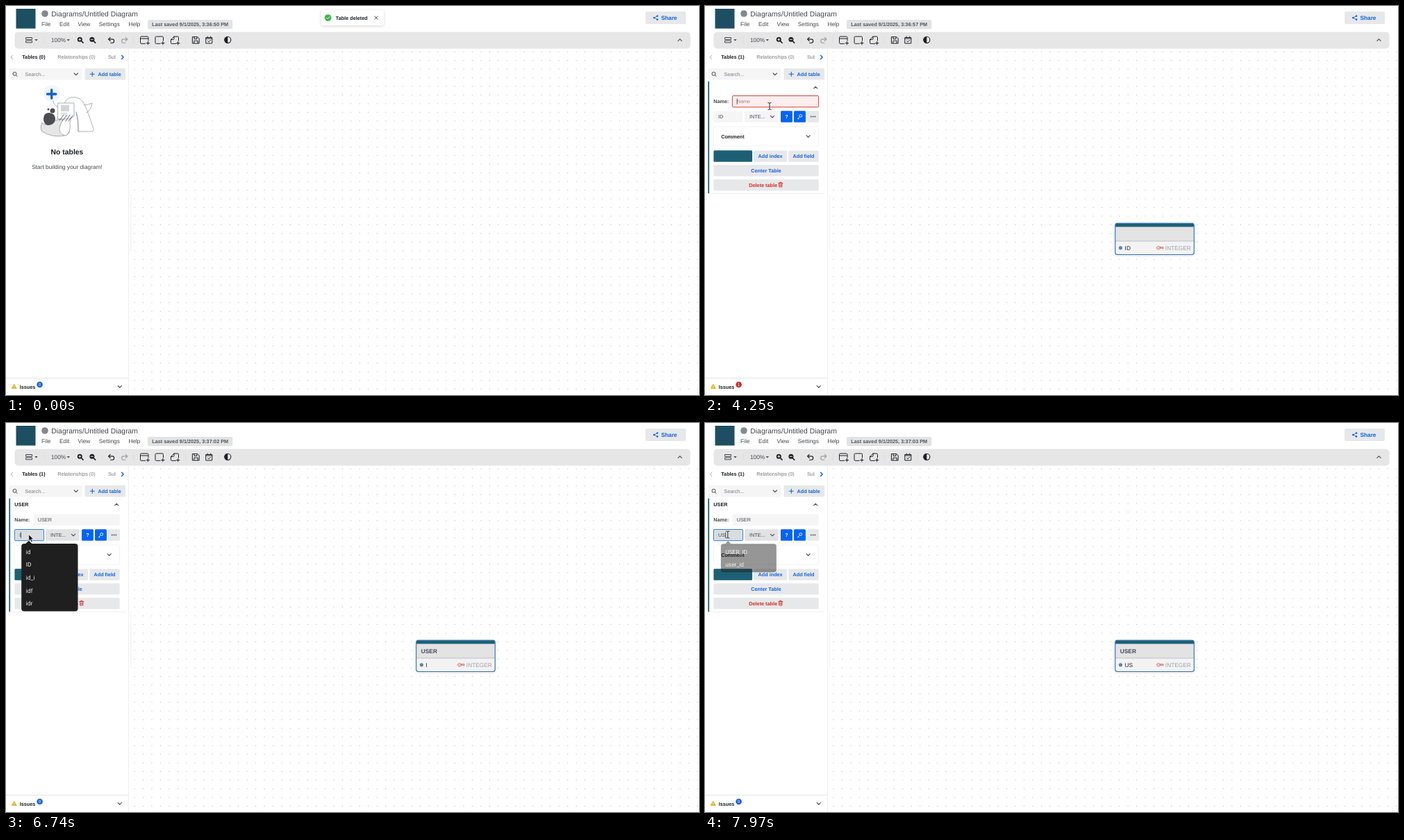
Animation of 998x561 px, one loop 7.99 s. Source, as an HTML page:

```html
<!DOCTYPE html>
<html lang="en">
<head>
<meta charset="utf-8">
<title>Diagram editor</title>
<style>
html, body { margin: 0; width: 100%; height: 100%; overflow: hidden; background: #fff; }
svg { display: block; }
text { font-family: "Liberation Sans", Arial, sans-serif; text-rendering: geometricPrecision; white-space: pre; }
.menu text { font-family: Roboto, sans-serif; }
.soft { filter: drop-shadow(0 1px 2px rgba(0,0,0,.16)); }
</style>
</head>
<body>
<svg id="stage" width="998" height="561" viewBox="0 0 998 561">
  <defs>
    <pattern id="dots" x="178.76" y="59.76" width="12.475" height="12.475" patternUnits="userSpaceOnUse">
      <circle cx="6.24" cy="6.24" r=".55" fill="#929ca5"/>
    </pattern>
    <clipPath id="tabClip"><rect x="140" y="64" width="18" height="20"/></clipPath>
  </defs>
  <g id="base"></g>
  <g id="live"></g>
</svg>
<script>
const LOOP = 7990, S = 7.277, M = 8.32, L = 10.4;
const INK = '#1c1f23', GREY = '#45484d', BLUE = '#1063dd', FILL = '#0064fa',
      BTN = '#e7e8ea', PALE = '#f5f5f6', TEAL = '#1d6075', RED = '#d52a22';

// SVG helpers; text is placed by its vertical centre
const rect = (x, y, w, h, fill, r = 0, more = '') =>
  `<rect x="${x}" y="${y}" width="${w}" height="${h}" rx="${r}" fill="${fill}" ${more}/>`;
const circle = (x, y, r, fill, more = '') => `<circle cx="${x}" cy="${y}" r="${r}" fill="${fill}" ${more}/>`;
const text = (x, y, s, size = S, fill = INK, bold = 0, anchor = 'start') =>
  `<text x="${x}" y="${y + size * .36}" font-size="${size}" fill="${fill}" text-anchor="${anchor}" font-weight="${bold ? 700 : 400}">${s}</text>`;
const line = (d, color = INK, w = 1, fill = 'none') =>
  `<path d="${d}" fill="${fill}" stroke="${color}" stroke-width="${w}" stroke-linecap="round" stroke-linejoin="round"/>`;
const shape = (d, fill) => `<path d="${d}" fill="${fill}"/>`;
const group = (s, more) => `<g ${more}>${s}</g>`;
const chevron = (x, y, up = 0, color = GREY) => {
  const h = up ? -1.3 : 1.3;
  return line(`M${x - 2.6} ${y - h}L${x} ${y + h}L${x + 2.6} ${y - h}`, color, 1.1);
};
const caretDown = (x, y) => shape(`M${x - 2.2} ${y - 1}h4.4l-2.2 2.4z`, GREY);
const button = (x, y, w, label, color = BLUE) =>
  rect(x, y, w, 16.3, BTN, 1.5) + text(x + w / 2, y + 8.2, label, S, color, 1, 'middle');

// Time helpers
const clamp = v => Math.min(1, Math.max(0, v));
const ramp = (t, a, b) => clamp((t - a) / (b - a));
const ease = v => v * v * (3 - 2 * v);
const pick = (t, steps) => steps.filter(s => s[0] <= t).pop()[1];

const measure = document.createElement('canvas').getContext('2d');
measure.font = '100px "Liberation Sans", Arial, sans-serif';
const width = (s, size = S) => measure.measureText(s).width * size / 100;

function toolbar() {
  let s = rect(12.5, 37.5, 973, 24, '#e6e6e7', 5);
  for (const x of [55.5, 138, 183.5, 258, 306]) s += rect(x, 44, .5, 10, '#d6d7d9');
  s += line('M29 45.5h8.500v2.800h-8.500zM29 50h8.500v2.800h-8.500z', GREY, 1) + caretDown(43.5, 49);
  s += text(65, 49, '100%', M, GREY) + caretDown(89.800, 49);
  for (const x of [106.3, 123.9])
    s += circle(x, 48.3, 3.5, INK) + line(`M${x + 2.6} 50.900l2.200 2.200`, INK, 1.5) + line(`M${x - 1.6} 48.300h3.200`, '#fff', .9);
  s += line('M106.3 46.700v3.200', '#fff', .9);
  s += line('M150.200 45.300l-2.700 2.600 2.700 2.600M147.800 47.900h5.200a2.700 2.700 0 0 1 0 5.400h-2.500', INK, 1.1);
  s += line('M172.200 45.300l2.700 2.600-2.700 2.600M174.600 47.900h-5.200a2.700 2.700 0 0 0 0 5.400h2.500', '#9a9da1', 1.1);
  return s;
}

function tools() {
  let s = '';
  const plus = x => line(`M${x} 53.500h4.400M${x + 2.2} 51.300v4.400`, INK, 1);
  for (const x of [193.5, 215])
    s += line(`M${x + 7} 54.300h-5.500a1.500 1.500 0 0 1-1.500-1.500v-7.300a1.500 1.500 0 0 1 1.500-1.500h8.500a1.500 1.500 0 0 1 1.500 1.500v4.500`, INK, 1) + plus(x + 8.700);
  s += line('M194 47h10.500', INK, 1);
  s += line('M244.500 54.300h-5.500a1.500 1.500 0 0 1-1.500-1.500v-4.300l4.500-4.500h5a1.500 1.500 0 0 1 1.500 1.500v4.500M237.500 48.500h3a1.500 1.500 0 0 0 1.500-1.500v-3', INK, 1) + plus(245.500);
  s += line('M268.800 44.500h7l2.400 2.400v7h-9.400zM271 44.700v2.800h4v-2.800M270.800 53.700v-3.500h5.400v3.500', INK, 1);
  s += line('M288.200 45.500h8.600v8.400h-8.600zM288.200 47h8.600M290.300 44v1.500M294.700 44v1.500M290.700 50.500l1.400 1.300 2.500-2.500', INK, 1);
  s += circle(319.300, 48.800, 4.600, 'none', `stroke="${INK}" stroke-width="1.1"`) + shape('M319.300 44.200a4.600 4.600 0 0 0 0 9.200z', INK);
  return s;
}

function base() {
  let s = rect(177, 62, 821, 499, 'url(#dots)');
  s += rect(176, 62, .8, 499, '#e9eaeb') + rect(179.3, 272, 1, 82, '#f0f0f1');
  s += rect(14.5, 4, 28, 28.5, '#1d4f63') + circle(56, 11, 4.8, '#85888c');
  s += text(65.3, 11, 'Diagrams/Untitled Diagram', L, GREY);
  [[51, 'File'], [77, 'Edit'], [103.5, 'View'], [133.800, 'Settings'], [176.400, 'Help']]
    .forEach(([x, w]) => s += text(x, 26.3, w, M, GREY));
  s += rect(204, 20, 122.3, 13.3, '#e2e3e5', 2);
  s += rect(921, 8, 58, 18, BTN, 2) + text(943.4, 17, 'Share', M, BLUE, 1);
  s += line('M938 14.600l-4.700 2.400 4.700 2.400', BLUE, .8) +
    circle(938, 14.5, 1.3, BLUE) + circle(933.3, 17, 1.3, BLUE) + circle(938, 19.5, 1.3, BLUE);
  s += toolbar() + chevron(970.5, 49, 1);
  s += line('M9.700 71.200l-2.500 2.700 2.500 2.700', '#a5a7aa', 1) + line('M166.600 71.200l2.500 2.700-2.500 2.700', BLUE, 1.4);
  s += group(text(147, 73.8, 'Subject Areas', S, '#77797c'), 'clip-path="url(#tabClip)"');
  s += rect(4.5, 90, 104.5, 16.5, PALE, 1.5) + text(27.300, 98.300, 'Search...', S, '#77797c');
  s += circle(12.5, 97.8, 2.5, 'none', `stroke="${GREY}" stroke-width="1"`) + line('M14.400 99.700l1.800 1.800', GREY, 1) + chevron(100.8, 98.3);
  s += rect(113.5, 90, 58.5, 16.5, BTN, 1.5) + line('M121.300 98.300h6M124.300 95.300v6', BLUE, 1.1) + text(132.600, 98.300, 'Add table', S, BLUE, 1);
  s += rect(0, 535.500, 176, 1, '#f4f4f4') + rect(0, 536.5, 176, 1, '#e6e7e8');
  s += line('M11.900 545.700l3.300 5.900h-6.600z', '#e5b220', 1, '#e5b220') + line('M11.900 547.800v1.700M11.900 551v.1', '#fff', .8);
  return s + text(19.700, 549, 'Issues', S, INK, 1) + chevron(163.8, 549);
}

function emptyState() {
  const g = '#8c8f93';
  let s = circle(66, 126, 12, '#f0f6fd');
  s += line('M84 142C86 129 103 129 110 137C116 145 121 163 126 177Q127 181 122 181H104Q104 165 101 153', g, .7, '#fff');
  s += line('M112 143Q117 143 124 140Q123 150 116 154M101 153Q105 160 104 181', g, .7);
  s += line('M52 169Q60 175 70 166Q82 158 90 172Q95 185 84 187Q66 190 52 181Q48 175 52 169Z', g, .7, '#e6e6e7');
  s += line('M78 172Q74 185 86 187Q94 182 92 168L97 153Q85 152 78 172Z', g, .7, '#fff');
  s += line('M75 140h23v19l-7 4H75z', g, .7, '#fff') + rect(79, 143, 12, 9, '#d4d5d7') + line('M79 154.500h9M79 157h7', '#aaa', .7);
  s += line('M77 165l6-8M81 166l7-9M86 166l6-9M90 166l6-8', '#63666a', 1);
  s += shape('M54 163Q54 154 62 154Q71 154 71 164Q69 172 60 172Q54 170 54 163Z', '#4b4d50') + circle(67, 151, 3.5, '#4b4d50') + circle(61, 149, 1.5, '#4b4d50');
  s += line('M68 137q1 7 6 8', g, .7);
  s += line('M59.500 127h12.400M65.700 120.800v12.400', '#1160d8', 3.3);
  return s + text(88, 210.3, 'No tables', L, INK, 1, 'middle') + text(88, 231.8, 'Start building your diagram!', M, GREY, 0, 'middle');
}

function card(t, name, field) {
  const edge = t < 2500 ? '#5c6168' : '#2f71bb';
  let s = group(rect(590.8, 313.5, 113.5, 45, '#f3f3f4', 3), 'class="soft"');
  s += rect(591, 318, 113, 21, '#e3e3e4') + rect(591, 338.700, 113, .7, '#a8abae');
  s += shape('M591 318.500v-2.500q0-2.500 2.500-2.500h108q2.500 0 2.500 2.500v2.500z', TEAL);
  s += rect(590.8, 313.3, 113.5, 45.2, 'none', 3, `stroke="${edge}" stroke-width="1.1"`);
  s += text(597.800, 329, name, M, GREY, 1) + circle(598.4, 348.8, 2.6, '#5b84a8') + text(604.600, 348.8, field, M, INK);
  s += line('M655 347.800h5v2h-1.500v-.6h-3.500M655 347.500a2.500 2.200 0 1 0 0 2.700z', '#d45a58', .9) + circle(652.6, 348.8, .6, '#d45a58');
  return s + text(699.800, 348.8, 'INTEGER', M, '#9c9fa3', 0, 'end');
}

function panel(t, name, field) {
  const o = name ? 2 : 0, onName = t >= 3120 && t < 6130, onField = t >= 6130;
  const bottom = 129.5 + (141 + o) * ease(ramp(t, 2550, 2840));
  let s = '';
  if (t >= 2550) {
    const edge = !name ? RED : onName ? '#1f74d0' : 'none';
    s += text(12.300, 137.800, 'Name:', S, GREY, 1);
    s += rect(39.400, 129.4, 124.2, 16.4, name ? PALE : '#fceeec', 1.5, `stroke="${edge}" stroke-width=".9"`);
    s += text(45.700, 137.800, name || 'Name', S, name ? GREY : '#a08988');
    if (onName && (t < 3430 || t >= 3660) && !(t >= 4100 && t < 4250))
      s += rect(45.800 + width(name), 133.5, .7, 8.5, INK);
    s += rect(12.4, 151.5, 42.2, 16.2, onField ? '#d9dde1' : PALE, 1.5, onField ? 'stroke="#1f74d0" stroke-width=".9"' : '');
    s += text(19, 159.600, field, S, GREY);
    if (onField) s += rect(19.300 + width(field), 155.4, .7, 8.5, INK);
    s += rect(57, 151.3, 48.5, 16.5, onField ? '#e1e2e3' : PALE, 1.5) + text(64, 159.600, 'INTE...', S, GREY) + chevron(97, 159.6);
    s += rect(109, 151.3, 17, 16.5, FILL, 1.5) + text(117.5, 159.6, '?', S, '#fff', 1, 'middle');
    s += rect(128, 151.3, 17, 16.5, FILL, 1.5) + circle(137.700, 158.4, 1.9, 'none', 'stroke="#fff" stroke-width=".9"') + line('M136.300 159.900l-2.800 2.800h1.600', '#fff', .9);
    s += rect(147, 151.3, 17, 16.5, BTN, 1.5) + [152.8, 155.6, 158.4].map(x => circle(x, 159.5, .9, GREY)).join('');
    s += rect(12.4, 174, 151.3, 28, '#fff', 2.5, 'stroke="#ececed" stroke-width=".7"') + text(23.200, 188, 'Comment', S, INK, 1) + chevron(148.6, 188);
    s += rect(12.4, 208.3, 55.7, 16.5, TEAL, 1.5) + button(70, 208.4, 48.200, 'Add index') + button(120.3, 208.4, 43.400, 'Add field');
    s += button(12.4, 229.3, 151.3, 'Center Table') + button(12.4, 250, 151.3, '', RED);
    s += text(63.300, 258.2, 'Delete table', S, RED, 1) + line('M105.800 255.500h6M107.600 255.300v-1h2.400v1M106.600 255.700l.2 5.300h4l.2-5.300M108 257.300v2M109.700 257.300v2', RED, .9);
    s = group(s, `transform="translate(0 ${o})"`);
  }
  s = rect(4.3, 108.8, 1.8, bottom - 108.8, TEAL) + text(12.300, 117.800, name, S, INK, 1) + chevron(159.2, 117.6, t >= 2520) + s;
  return `<svg width="176" height="${bottom}">${s}</svg>` + rect(6, bottom - .5, 166, .7, '#e9eaeb');
}

function popup(items, a) {
  if (a <= 0) return '';
  const h = items.length > 2 ? 97.5 : 41.500, k = .97 + .03 * a, cx = 62.8, cy = 174 + h / 2;
  const s = rect(22.200, 174, 81.3, h, '#1f1f1f', 4) + shape('M28 174.300l4.800-4.500 4.800 4.500z', '#1f1f1f') +
    items.map((w, i) => text(28.700, 185.5 + 18.7 * i, w, 8.5, '#f0f0f0')).join('');
  return group(s, `class="menu" opacity="${a}" transform="translate(${cx * (1 - k)} ${cy * (1 - k)}) scale(${k})"`);
}

function toast(t) {
  const e = ease(ramp(t, 860, 1110));
  if (e === 1) return '';
  const s = group(rect(454, 6, 90, 22, '#fff', 3), 'class="soft"') + circle(463.7, 17, 4.8, '#3bb346') +
    line('M461.500 17.100l1.600 1.600 2.900-3.200', '#fff', 1) + text(474.800, 17, 'Table deleted', S, INK, 1) +
    line('M531 14.800l4.400 4.400M535.400 14.800l-4.400 4.400', GREY, 1);
  return group(s, `opacity="${1 - e}" transform="translate(0 ${-30 * e})"`);
}

const PATH = [[360, 800, 457], [500, 211, 77], [700, 211, 77], [820, 197, 50], [1760, 197, 50],
  [2400, 94, 122], [2860, 94, 122], [3080, 93, 144.5], [5820, 93, 144.5], [6120, 32.8, 161], [LOOP, 32.8, 161]];
const POINTER = [[0, 'arrow'], [780, 'hand'], [1800, 'arrow'], [2360, 'hand'], [2960, 'beam'], [6720, 'arrow'], [6980, 'beam']];
const CURSORS = {
  arrow: line('M0 0v9.300l2.200-2 1.500 3.500 1.600-.7-1.500-3.400h3z', '#fff', .7, '#000'),
  hand: line('M-.8 .6q.8-1.200 1.700 0v3.500l4 .9q1 .4.900 1.600l-.7 3.900h-5l-2.900-3.800q.2-1.300 2 0z', '#fff', .6, '#111'),
  beam: line('M-2.200-5q1.700 0 2.200.8q.5-.8 2.200-.8M0-4.200v8.400M-2.200 5q1.700 0 2.200-.8q.5.8 2.200.8', '#222', .9)
};
function cursor(t) {
  if (t < 360) return '';
  const i = PATH.findIndex(p => p[0] > t), [t0, x0, y0] = PATH[i - 1], [t1, x1, y1] = PATH[i];
  const e = ease(ramp(t, t0, t1));
  return group(CURSORS[pick(t, POINTER)], `transform="translate(${x0 + (x1 - x0) * e} ${y0 + (y1 - y0) * e})"`);
}

function live(t) {
  const made = t >= 1360;
  const name = pick(t, [[0, 'TABLE_0'], [3430, 'TABLE_'], [3930, 'TABLE'], [3960, 'TABL'], [3990, 'TAB'], [4030, 'TA'],
    [4060, 'T'], [4100, ''], [4680, 'U'], [5020, 'US'], [5210, 'USE'], [5340, 'USER']]);
  const field = pick(t, [[0, 'ID'], [6720, 'I'], [6980, ''], [7440, 'U'], [7880, 'US']]);
  const clock = pick(t, [[0, '36:50'], [1400, '36:57'], [6330, '37:01'], [6730, '37:02'], [7460, '37:03']]);
  const issues = name && field ? 0 : 1;
  const tip = ramp(t, 900, 1000) - ramp(t, 1780, 1880);

  let s = text(265.2, 26.5, `Last saved 9/1/2025, 3:${clock} PM`, S, '#515459', 1, 'middle');
  if (t >= 780 && t < 1800) s += rect(188, 41, 22.500, 16.3, '#c5c7c9', 2);
  s += tools();
  s += text(23.200, 73.8, `Tables (${+made})`, S, INK, 1) + text(74.200, 73.8, 'Relationships (0)', S, '#77797c');
  s += circle(48.6, 546, 4.3, issues ? RED : BLUE) + text(48.6, 546, issues, 6.2, '#fff', 0, 'middle');
  s += made ? card(t, name, field) + panel(t, name, field) : emptyState();
  s += popup(['id', 'ID', 'id_i', 'idf', 'idr'], ramp(t, 6160, 6280) - ramp(t, 6840, 7020));
  s += popup(['USER_ID', 'user_id'], ramp(t, 7470, 7595) - ramp(t, 7880, 8050));
  if (tip > 0) s += group(rect(178, 62.3, 43, 18.5, '#41464c', 3) + shape('M196 62.500l3.500-2.500 3.500 2.500z', '#41464c') +
    text(199.5, 71.7, 'Add table', S, '#fff', 0, 'middle'), `opacity="${tip}"`);
  return s + toast(t) + cursor(t);
}

const layer = document.getElementById('live');
document.getElementById('base').innerHTML = base();
let last;
function frame() {
  const s = live(performance.now() % LOOP);
  if (s !== last) layer.innerHTML = last = s;
  requestAnimationFrame(frame);
}
frame();
</script>
</body>
</html>
```
